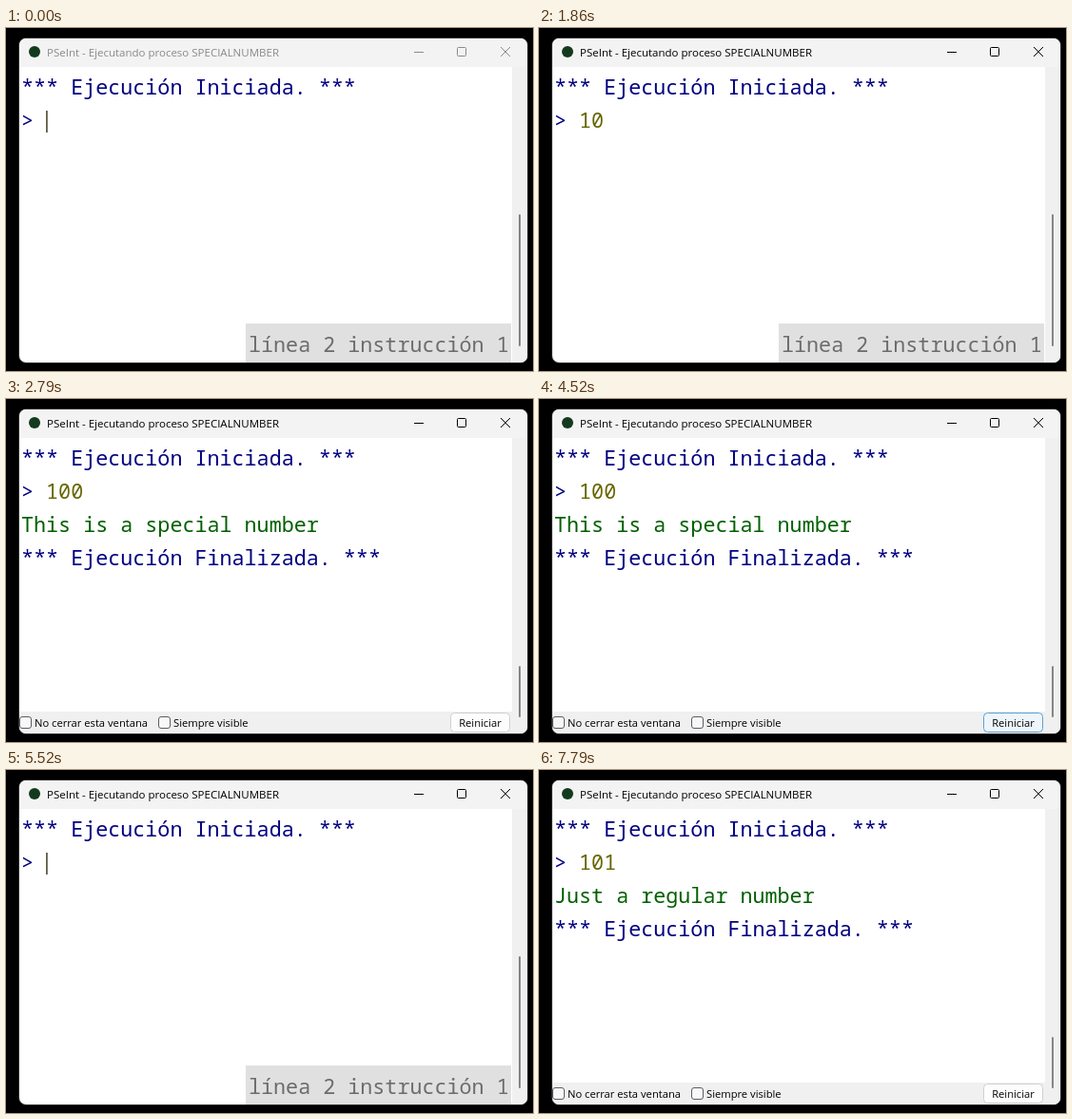
These frames come from a looping animation (554x361 px, 8000 ms). An HTML page:

```html
<!DOCTYPE html>
<html lang="es">
<head>
<meta charset="utf-8">
<title>Console run</title>
<style>
  html, body { margin: 0; width: 100%; height: 100%; overflow: hidden; background: #000; }
  svg { display: block; width: 554px; height: 361px; }
  text { white-space: pre; }
  .ui { font: 11.5px "Open Sans", "Noto Sans", sans-serif; }
  .small { font-size: 11.2px; }
  .console { font: 21.72px "Noto Sans Mono", "DejaVu Sans Mono", monospace; fill: #000080; }
</style>
</head>
<body>
<svg viewBox="0 0 554 361">
  <clipPath id="frame"><rect x="14" y="11" width="534" height="341" rx="7"/></clipPath>
  <rect x="13.5" y="10.5" width="535" height="342" rx="7.5" fill="none" stroke="#333"/>
  <g clip-path="url(#frame)">
    <rect x="14" y="11" width="534" height="341" fill="#fff"/>
    <rect x="14" y="11" width="534" height="30" fill="#f3f3f3"/>
    <rect x="532" y="41" width="16" height="311" fill="#f0f0f0"/>
    <rect id="thumb" x="539" width="2" rx="1" fill="#858585"/>

    <circle cx="30" cy="25" r="6" fill="#143a1e"/>
    <g id="titlebar">
      <text class="ui" x="43" y="30">PSeInt - Ejecutando proceso SPECIALNUMBER</text>
      <path d="M429 25.5h10M520 20l10 10m0-10l-10 10" fill="none" stroke="currentColor"/>
      <rect x="474.5" y="20.5" width="9" height="9" rx="1" fill="none" stroke="currentColor"/>
    </g>

    <g id="output" class="console">
      <text x="16" y="70">*** Ejecución Iniciada. ***</text>
      <text x="16" y="105">&gt; <tspan id="typed" fill="#666600"></tspan></text>
      <rect id="caret" y="87" width="1.8" height="23" fill="#605c48"/>
    </g>

    <g id="status" class="console">
      <rect x="252" y="311" width="279" height="41" fill="#e0e0e0"/>
      <text x="255" y="341" fill="#6c6c6c">línea 2 instrucción 1</text>
    </g>

    <rect id="bar" x="14" y="329" height="23" fill="#f0f0f0"/>
    <g id="finished">
      <g class="console">
        <text id="result" x="16" y="140" fill="#006000"></text>
        <text x="16" y="175">*** Ejecución Finalizada. ***</text>
      </g>
      <g fill="#f8f8f8" stroke="#5c5c66">
        <rect x="14.5" y="334.5" width="12" height="12" rx="2.5"/>
        <rect x="160.5" y="334.5" width="12" height="12" rx="2.5"/>
        <rect id="button" x="467.5" y="330.5" width="62" height="20" rx="4"/>
      </g>
      <g class="ui small">
        <text x="30" y="345">No cerrar esta ventana</text>
        <text x="176" y="345">Siempre visible</text>
        <text x="498.5" y="345" text-anchor="middle">Reiniciar</text>
      </g>
    </g>
  </g>
</svg>
<script>
const LOOP = 8000;
const el = id => document.getElementById(id);
const show = (id, on) => el(id).setAttribute("visibility", on ? "visible" : "hidden");
const set = (id, attrs) => {
  for (const name in attrs) el(id).setAttribute(name, attrs[name]);
};

// Button looks: [fill, stroke]
const BUTTON = {
  idle: ["#fdfdfd", "#d0d0d0"],
  warm: ["#eef5fb", "#5aa2d0"],
  hover: ["#e0eef9", "#0078d4"],
  pressed: ["#cce4f7", "#005499"]
};

// Each entry changes part of the state from its time (ms) onward.
const timeline = [
  [0, { active: false, mode: "run", typed: "", caret: true, button: "idle", bar: 0 }],
  [390, { caret: false }],
  [930, { caret: true }],
  [990, { active: true }],
  [1390, { caret: false }],
  [1590, { typed: "1" }],
  [1860, { typed: "10" }],
  [1920, { caret: true }],
  [2120, { typed: "100" }],
  [2390, { caret: false }],
  [2720, { mode: "blank", bar: 452 }],
  [2790, { mode: "done", bar: 518, result: "This is a special number" }],
  [4520, { button: "warm" }],
  [4590, { button: "hover" }],
  [4650, { button: "pressed" }],
  [4920, { button: "hover" }],
  [4990, { button: "warm" }],
  [5050, { mode: "blank", bar: 0 }],
  [5120, { mode: "run", typed: "", button: "idle" }],
  [5520, { caret: true }],
  [5980, { caret: false }],
  [6330, { typed: "1" }],
  [6530, { typed: "10" }],
  [6590, { caret: true }],
  [6790, { typed: "101" }],
  [6990, { caret: false }],
  [7520, { caret: true }],
  [7790, { mode: "done", bar: 518, caret: false, result: "Just a regular number" }]
];

function stateAt(time) {
  const past = timeline.filter(([start]) => start <= time);
  return Object.assign({}, ...past.map(([, change]) => change));
}

function draw(time) {
  const { active, mode, typed, caret, button, bar, result = "" } = stateAt(time);
  const running = mode === "run";
  const ink = active ? "#000" : "#8a8a8a";
  const thumbTop = running ? 196 : 281;
  const [fill, stroke] = BUTTON[button];

  set("titlebar", { fill: ink, color: ink });
  set("thumb", { y: thumbTop, height: 335 - thumbTop });
  set("caret", { x: 42 + 13 * typed.length });
  set("bar", { width: bar });
  set("button", { fill, stroke });
  el("typed").textContent = typed;
  el("result").textContent = result;

  show("output", mode !== "blank");
  // An inherited "visible" would override the hidden parent, so the caret checks the mode too.
  show("caret", running && caret);
  show("status", running);
  show("finished", mode === "done");
}

const begin = performance.now();
function tick() {
  draw((performance.now() - begin) % LOOP);
  requestAnimationFrame(tick);
}
tick();
</script>
</body>
</html>
```
